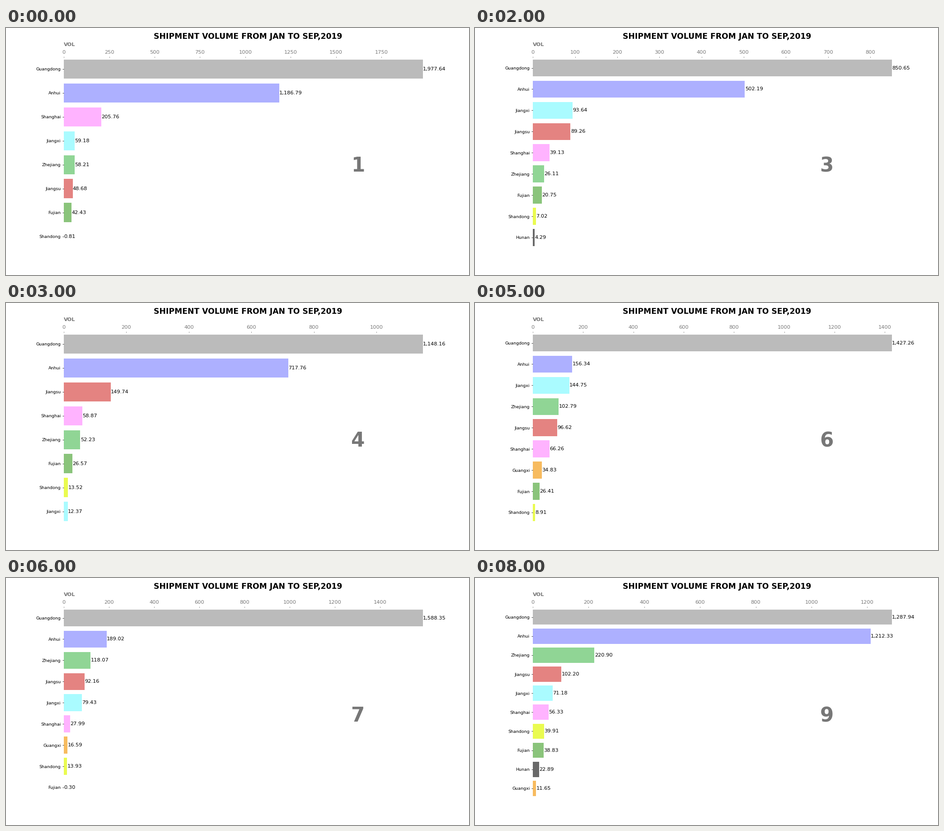
Animation, 1025 px wide and 547 px high, one loop 9000 ms. Source, as a matplotlib script:

```python
import numpy as np
import matplotlib.pyplot as plt
from matplotlib.animation import FuncAnimation

WIDTH, HEIGHT, DPI = 1025, 547, 64
SCALE = WIDTH / 15 / DPI  # the layout is designed 15 inches wide
GREY = "#777777"
LABEL_GAP = 0.6           # in data units
MONTHS = 9
MIN_SHARE = 0.0045        # estimates below this share of the leader are hidden

# Bar colour and volume at the key months; the months between are estimated.
KEY_MONTHS = [1, 2, 4, 5, 7, 9]
PROVINCES = {
    "Guangdong": ("#bbbbbb", [1977.64, 553.14, 1148.16, 1266.18, 1588.35, 1287.94]),
    "Anhui": ("#adb0ff", [1186.79, 286.63, 717.76, 123.65, 189.02, 1212.33]),
    "Shanghai": ("#ffb3ff", [205.76, 19.39, 58.87, 104.53, 27.99, 56.33]),
    "Jiangxi": ("#aafbff", [59.18, 174.90, 12.37, 210.08, 79.43, 71.18]),
    "Zhejiang": ("#90d595", [58.21, 0, 52.23, 87.52, 118.07, 220.90]),
    "Jiangsu": ("#e48381", [48.68, 28.78, 149.74, 101.08, 92.16, 102.20]),
    "Fujian": ("#8ac47b", [42.43, 14.93, 26.57, 52.53, 0.30, 38.83]),
    "Shandong": ("#eafb50", [0.81, 0.52, 13.52, 3.88, 13.93, 39.91]),
    "Guangxi": ("#f7bb5f", [0, 0.40, 0, 53.06, 16.59, 11.65]),
    "Hunan": ("#696969", [0, 8.59, 0, 11.42, 0, 22.89]),
}


def pt(size):
    return size * SCALE


def ranking(month):
    """Rows of (volume, name, colour), smallest first."""
    rows = sorted((np.interp(month, KEY_MONTHS, volumes), name, color)
                  for name, (color, volumes) in PROVINCES.items())
    floor = 0 if month in KEY_MONTHS else MIN_SHARE * rows[-1][0]
    return [row for row in rows if row[0] > floor]


plt.rcParams["font.family"] = "DejaVu Sans"
fig = plt.figure(figsize=(WIDTH / DPI, HEIGHT / DPI), dpi=DPI,
                 facecolor="white")
ax = fig.add_axes([0.125, 0.11, 0.775, 0.77])


def note(x, y, text, size, color):
    ax.text(x, y, text, transform=ax.transAxes, size=pt(size), color=color,
            weight="bold", ha="left")


def style_axes():
    ax.xaxis.tick_top()
    ax.tick_params(length=pt(3.5), width=pt(0.8), pad=pt(3.5))
    ax.tick_params(axis="x", colors=GREY, labelsize=pt(12))
    ax.tick_params(axis="y", labelsize=pt(10))
    ax.margins(0, 0.01)
    ax.set_frame_on(False)


def draw(index):
    month = index + 1
    ax.clear()
    volumes, names, colors = zip(*ranking(month))
    ax.barh(names, volumes, color=colors)
    for row, volume in enumerate(volumes):
        ax.text(volume + LABEL_GAP, row, f"{volume:,.2f}", size=pt(12),
                ha="left", va="center")
    style_axes()
    note(0.8, 0.4, str(month), 46, GREY)
    note(0, 1.06, "VOL", 12, GREY)
    note(0.25, 1.1, "SHIPMENT VOLUME FROM JAN TO SEP,2019", 18, "black")
    return []


anim = FuncAnimation(fig, draw, frames=MONTHS, init_func=lambda: draw(0),
                     interval=1000, repeat=True, repeat_delay=0)
plt.show()
```
